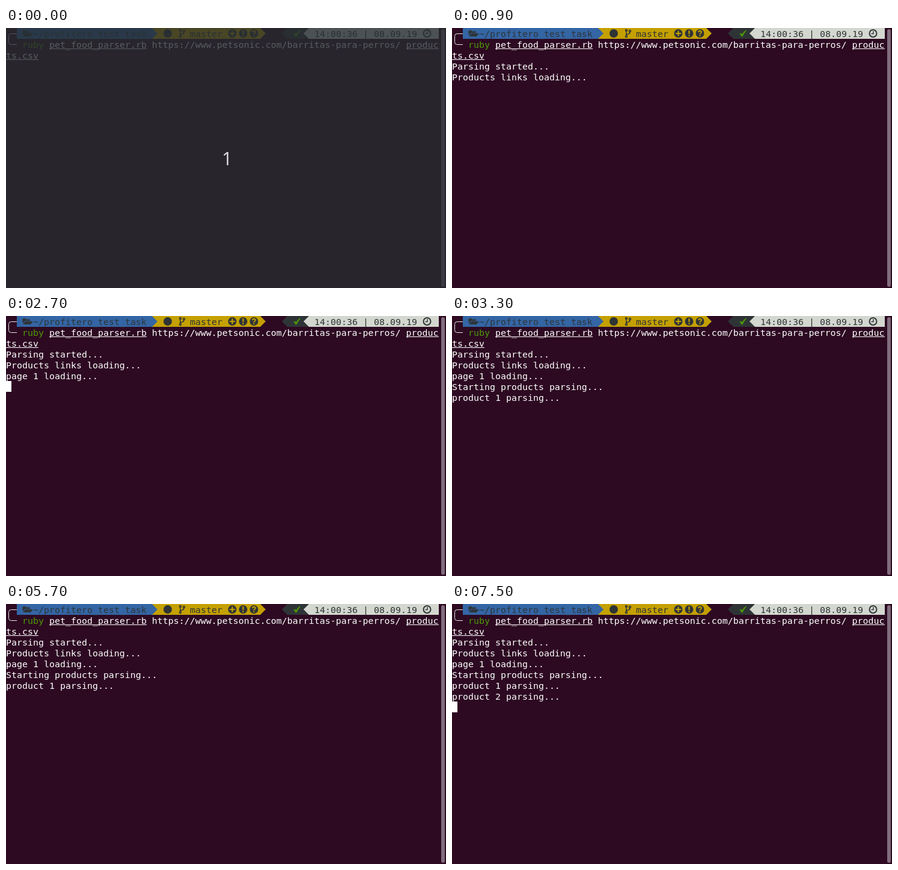
Animation of 732 by 432 pixels, one loop 8 s. Source, as an HTML page:

```html
<!DOCTYPE html>
<html lang="en">
<head>
<meta charset="utf-8">
<title>Terminal session</title>
<style>
  html, body { margin: 0; width: 100%; height: 100%; overflow: hidden; background: #2d0a22; }
  svg { display: block; }
  text { font: 14.95px "DejaVu Sans Mono", monospace; fill: #fff; white-space: pre; }
  .dark { fill: #2e3436; }
  .green { fill: #4e9a06; }
  #count text { font: 31px "Open Sans", sans-serif; fill: #dfdde0; }
</style>
</head>
<body>
<svg width="732" height="432" viewBox="0 0 732 432">
  <rect width="732" height="432" fill="#2d0a22"/>
  <rect x="724" y="2" width="6" height="428" rx="3" fill="#816d7c"/>

  <!-- prompt, left side -->
  <path d="M18 9.5H8.5q-4 0-4 4v10q0 4 4 4H18" fill="none" stroke="#e8e6e8"/>
  <path d="M243 0H423L432 9 423 18H243z" fill="#c4a000"/>
  <path d="M18 0H243L252 9 243 18H18z" fill="#3465a4"/>
  <path class="dark" d="M27.500 12.500V5.500q0-1.500 1.500-1.500h3l1.500 1.500h5q1.500 0 1.500 1.500v1h-7q-1.500 0-2.300 1.200zM28.500 14l3-4.500q.5-.8 1.300-.8h10.700q1 0 .5.800l-2.500 3.700q-.5.800-1.300.800z"/>
  <text class="dark" x="45" y="15">~/profitero_test_task</text>
  <circle class="dark" cx="269" cy="9" r="7"/>
  <g fill="none" stroke="#2e3436" stroke-width="1.500">
    <circle cx="290" cy="4" r="1.500"/>
    <circle cx="290" cy="14" r="1.500"/>
    <circle cx="296" cy="5" r="1.500"/>
    <path d="M290 5.500v7M296 6.500q0 3-3 3.500t-3 2"/>
  </g>
  <text class="dark" x="306" y="15">master</text>
  <g class="dark">
    <circle cx="376.500" cy="9" r="7"/>
    <circle cx="394.500" cy="9" r="7"/>
    <circle cx="412.500" cy="9" r="7"/>
  </g>
  <g fill="none" stroke="#c4a000" stroke-width="2.200">
    <path d="M372 9h9M376.500 4.500v9M394.500 4v6M394.500 11.500v2.200"/>
    <path d="M410 7.200q.2-2.400 2.500-2.400t2.500 2q0 1.200-1.300 1.800t-1.200 2M412.500 11.700v2.200" stroke-width="1.900"/>
  </g>

  <!-- prompt, right side -->
  <path class="dark" d="M504 0H468L459 9 468 18H504z"/>
  <path d="M720 0H504L495 9 504 18H720z" fill="#d3d7cf"/>
  <path class="green" d="M478.500 9.500l2-1.200 2 2.200q2.500-4.300 6.500-7l1 .7q-4 4.200-6.700 10h-1.600z"/>
  <text class="dark" x="513" y="15">14:00:36 | 08.09.19</text>
  <g fill="none" stroke="#2e3436">
    <circle cx="700.500" cy="9" r="6" stroke-width="2"/>
    <path d="M701 5v4.500h-3.500" stroke-width="1.400"/>
  </g>

  <!-- command -->
  <text class="green" x="27" y="33">ruby</text>
  <text x="72" y="33">pet_food_parser.rb https://www.petsonic.com/barritas-para-perros/ produc</text>
  <text x="0" y="51">ts.csv</text>
  <path d="M72 34.500H234M666 34.500H720M0 52.500H54" stroke="#fff"/>

  <g id="output"></g>
  <rect id="cursor" width="9" height="18" fill="#fff"/>
  <g id="count">
    <rect width="732" height="432" fill="#272d31" opacity=".78"/>
    <text x="359" y="228">1</text>
  </g>
</svg>
<script>
const LOOP = 8000, CELL = 9, ROW = 18, BASELINE = 15, FIRST_ROW = 3;
const get = id => document.getElementById(id);
const output = get("output"), cursor = get("cursor"), count = get("count");

const lines = [
  "Parsing started...",
  "Products links loading...",
  "page 1 loading...",
  "Starting products parsing...",
  "product 1 parsing...",
  "product 2 parsing..."
].map((line, i) => {
  const el = document.createElementNS("http://www.w3.org/2000/svg", "text");
  el.textContent = line;
  el.setAttribute("y", (FIRST_ROW + i) * ROW + BASELINE);
  return output.appendChild(el);
});

// [start in ms, printed lines]
const prints = [[0, 0], [900, 2], [2700, 3], [3300, 5], [6300, 6]];

const show = (el, on) => el.style.display = on ? "" : "none";

function cursorOn(t) {
  if (t < 900) return t >= 300;
  return Math.floor((t - 900) / 600) % 2 === 1;
}

function draw(now) {
  const t = now % LOOP;
  const printed = prints.filter(([start]) => t >= start).pop()[1];
  const typing = t < 500;
  lines.forEach((el, i) => show(el, i < printed));
  cursor.setAttribute("x", typing ? 6 * CELL : 0);
  cursor.setAttribute("y", (typing ? 2 : FIRST_ROW + printed) * ROW);
  show(cursor, cursorOn(t));
  show(count, t < 300);
}

const begin = performance.now();
function tick() {
  draw(performance.now() - begin);
  requestAnimationFrame(tick);
}
tick();
</script>
</body>
</html>
```
